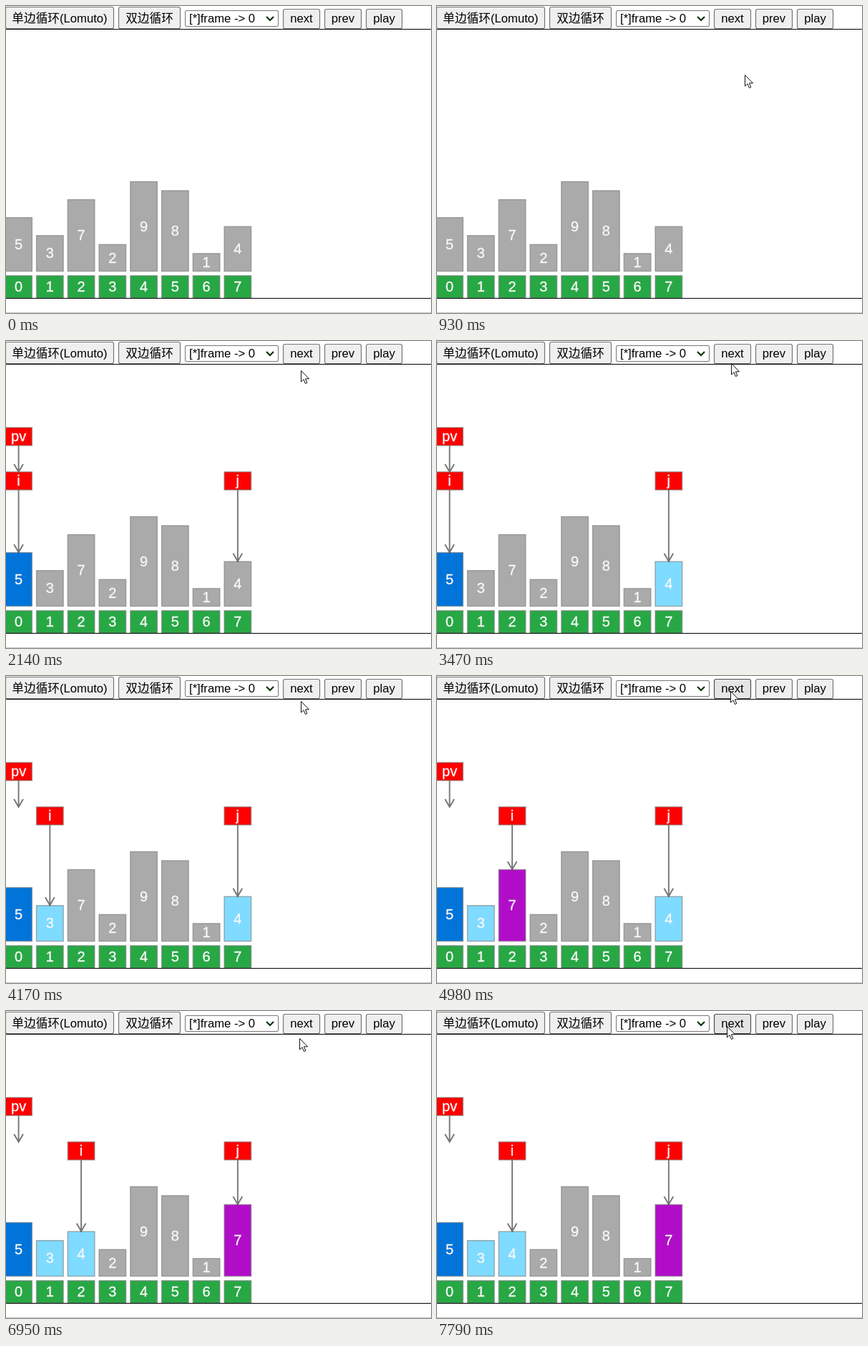
An HTML page for the animation above (8000 ms loop, 594x429 px).

```html
<!DOCTYPE html>
<html lang="zh-CN">
<head>
<meta charset="utf-8">
<title>双边循环</title>
<style>
  html, body { margin: 0; width: 100%; height: 100%; overflow: hidden; background: #fff; }
  svg { display: block; width: 594px; height: 429px; }
  text { font-family: "Liberation Sans", "Noto Sans CJK SC", "Noto Sans CJK", Arial, sans-serif; font-size: 16.67px; white-space: pre; }
  .cell text { font-size: 20px; fill: #f7f7f7; stroke: #f7f7f7; stroke-width: .35; text-anchor: middle; }
  .cell rect { stroke: rgba(128, 128, 128, .65); stroke-width: 1.4; }
  .arrow { fill: none; stroke: #222; stroke-width: 1.9; opacity: .62; }
  .button { fill: #efefef; stroke: #767676; stroke-width: 1.2; }
  .button.hover { fill: #e5e5e5; stroke: #4f4f4f; }
</style>
</head>
<body>
<svg id="stage" viewBox="0 0 594 429"></svg>
<script>
const NS = 'http://www.w3.org/2000/svg';
const stage = document.getElementById('stage');
const LOOP = 8000;
const GRAY = '#aaaaaa', GREEN = '#28a745', RED = '#ff0000';
const PIVOT = '#0074d9', DONE = '#7fdbff', FOUND = '#b10dc9';

function set(node, attrs) {
  for (const key in attrs) node.setAttribute(key, attrs[key]);
}

function add(parent, tag, attrs, text) {
  const node = document.createElementNS(NS, tag);
  set(node, attrs);
  if (text !== undefined) node.textContent = text;
  return parent.appendChild(node);
}

function show(node, on) {
  set(node, { display: on ? 'inline' : 'none' });
}

const centerX = col => 17.6 + 43.75 * col;
const barTop = value => 358 - 12.55 * value;
const clamp = (x, lo, hi) => Math.min(hi, Math.max(lo, x));

// Boxes with a centred white label
function makeCell(label) {
  const g = add(stage, 'g', { class: 'cell' });
  return { g, rect: add(g, 'rect', { width: 37.6 }), text: add(g, 'text', {}, label) };
}

function placeCell(cell, col, top, bottom, fill) {
  const x = centerX(col);
  set(cell.rect, { x: x - 18.8, y: top + .4, height: bottom - top - .8, fill });
  set(cell.text, { x, y: (top + bottom) / 2 + 6.8 });
}

function arrowPath(col, from, to) {
  const x = centerX(col);
  return `M${x} ${from}V${to}M${x - 6.4} ${to - 11}L${x} ${to}L${x + 6.4} ${to - 11}`;
}

// Toolbar
function makeButton(label, x, y, width) {
  const rect = add(stage, 'rect', { class: 'button', x: x + .5, y: y + .5, width: width - 1, height: 31 - y, rx: 2.5 });
  add(stage, 'text', { x: x + width / 2, y: 23, 'text-anchor': 'middle' }, label);
  return rect;
}

makeButton('单边循环(Lomuto)', -1, 1, 152);
makeButton('双边循环', 157, 1, 87);
const nextButton = makeButton('next', 387, 4, 52);
makeButton('prev', 445, 4, 52);
makeButton('play', 503, 4, 51);
add(stage, 'rect', { x: 250.5, y: 6.5, width: 130, height: 22, rx: 1.5, fill: '#fff', stroke: '#767676' });
add(stage, 'text', { x: 256, y: 23 }, '[*]frame -> 0');
add(stage, 'path', { d: 'M364 15L369 20L374 15', fill: 'none', stroke: '#0c330c', 'stroke-width': 2.2 });

// Array and pointers
const start = [5, 3, 7, 2, 9, 8, 1, 4];
const bars = start.map(makeCell);
start.forEach((_, col) => placeCell(makeCell(col), col, 376.4, 408.6, GREEN));
add(stage, 'path', { d: 'M0 32.5H594M0 408.5H594', stroke: '#000' });
add(stage, 'path', { d: 'M0 428.5H594', stroke: '#c8c8c8' });
const arrows = add(stage, 'path', { class: 'arrow' });
const [pv, iMark, jMark] = ['pv', 'i', 'j'].map(makeCell);

// Partition state after a number of clicks on "next"
function partition(clicks) {
  const values = [...start], j = values.length - 1;
  const i = clamp(clicks - 2, 0, 2);
  if (clicks > 4) [values[i], values[j]] = [values[j], values[i]];
  const color = col => {
    if (!clicks) return GRAY;
    if (!col) return PIVOT;
    const scanned = col <= i || (col === j && clicks > 1);
    if (!scanned) return GRAY;
    return values[col] <= values[0] ? DONE : FOUND;
  };
  return { values, i, j, color };
}

function drawArray(clicks) {
  const { values, i, j, color } = partition(clicks);
  bars.forEach((bar, col) => {
    bar.text.textContent = values[col];
    placeCell(bar, col, barTop(values[col]), 371, color(col));
  });
  placeCell(pv, 0, 120.5, 146.5, RED);
  placeCell(iMark, i, 182.5, 208.5, RED);
  placeCell(jMark, j, 182.5, 208.5, RED);
  set(arrows, {
    d: arrowPath(0, 146, 183) + arrowPath(i, 208, barTop(values[i])) + arrowPath(j, 208, barTop(values[j]))
  });
  [arrows, pv.g, iMark.g, jMark.g].forEach(node => show(node, clicks > 0));
}

// Mouse: enters, then dips off the button between presses
const ENTER = 460, RELEASE = 180, LIFT = 230, LEAVE = 460, DIP = 21;
const visits = [
  { at: 1580, x: 411, y: 24 },
  { at: 2400, x: 411, y: 22 },
  { at: 3600, x: 411, y: 16 },
  { at: 4700, x: 411, y: 21 },
  { at: 5800, x: 409, y: 17 },
  { at: 7845, x: 406, y: 21 }
];
const presses = visits.slice(0, -1).map(v => v.at);

const halo = add(stage, 'circle', { r: 15, fill: '#fff000', opacity: .6 });
const cursor = add(stage, 'path', {
  d: 'M.5 .5V16L4 12.7L6.4 18.5L8.8 17.5L6.4 11.8H11.5Z', fill: '#fff', stroke: '#111'
});

function ramp(t, from, length) {
  const f = clamp((t - from) / length, 0, 1);
  return f * f * (3 - 2 * f);
}

const mix = (a, b, f) => ({ x: a.x + (b.x - a.x) * f, y: a.y + (b.y - a.y) * f });

function mouseAt(t) {
  const far = { x: 497, y: 343 };
  const f = clamp((t - ENTER) / 900, 0, 1);
  let pos = mix(far, visits[0], 1 - (1 - f) ** 2);
  visits.slice(1).forEach((visit, k) => {
    const prev = visits[k];
    const rest = { x: prev.x + 2, y: prev.y + DIP };
    pos = mix(pos, rest, ramp(t, prev.at + LEAVE, 140));
    pos = mix(pos, visit, ramp(t, visit.at - 195, 140));
  });
  return pos;
}

function drawMouse(t) {
  const { x, y } = mouseAt(t);
  const visible = t >= ENTER;
  show(cursor, visible);
  show(halo, presses.some(at => t >= at && t < at + LIFT));
  set(cursor, { transform: `translate(${Math.round(x) - 1} ${Math.round(y)})` });
  set(halo, { cx: x, cy: y });
  nextButton.classList.toggle('hover', visible && x > 387 && x < 439 && y > 4 && y < 30);
}

function render(t) {
  drawArray(presses.filter(at => t >= at + RELEASE).length);
  drawMouse(t);
}

const origin = performance.now();
function tick() {
  render((performance.now() - origin) % LOOP);
  requestAnimationFrame(tick);
}
render(0);
requestAnimationFrame(tick);
</script>
</body>
</html>
```
